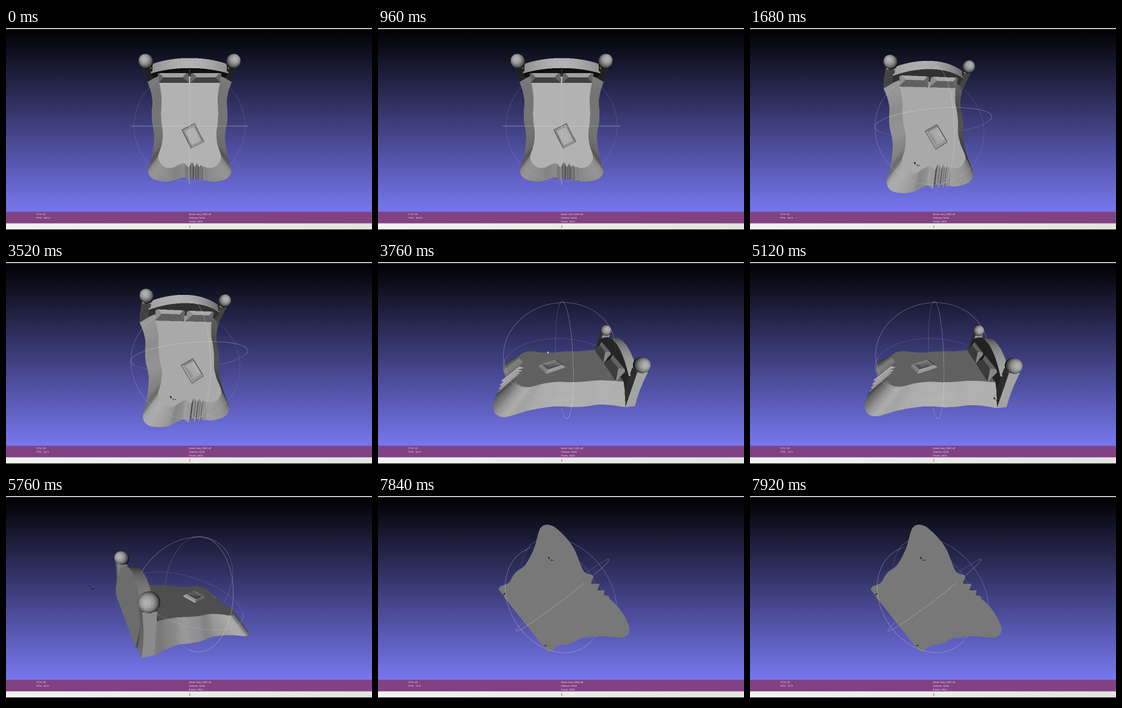
An HTML page with a canvas for the animation above (8000 ms loop, 600x338 px).

```html
<!DOCTYPE html>
<html lang="en">
<head>
<meta charset="utf-8">
<title>Bed mesh viewer</title>
<style>
html, body { margin: 0; width: 100%; height: 100%; overflow: hidden; background: #000; }
canvas, svg { position: absolute; left: 0; top: 0; width: 600px; height: 338px; }
text { font: 4.1px "Liberation Sans", Arial, sans-serif; fill: #eadcee; white-space: pre; text-rendering: geometricPrecision; }
</style>
</head>
<body>
<canvas id="view" width="1200" height="676"></canvas>
<svg viewBox="0 0 600 338">
  <text x="50" y="307.4">FOV: 60</text>
  <text x="50" y="313">FPS:</text>
  <text x="62" y="313" id="fps">200.0</text>
  <text x="300" y="307.4">Mesh: bed_0392.off</text>
  <text x="300" y="313">Vertices: 5446</text>
  <text x="300" y="318.6">Faces: 3810</text>
</svg>
<script>
const SS = 2, W = 600 * SS, H = 338 * SS;
const g = document.getElementById('view').getContext('2d');
const fps = document.getElementById('fps');
g.scale(SS, SS);

const lerp = (a, b, u) => a + (b - a) * u;
const clamp = u => Math.min(1, Math.max(0, u));
const smooth = u => (u = clamp(u)) * u * (3 - 2 * u);
const range = (n, f) => Array.from({ length: n + 1 }, (_, i) => f(i / n));
const sub = (a, b) => a.map((v, i) => v - b[i]);
const dot = (a, b) => a[0] * b[0] + a[1] * b[1] + a[2] * b[2];
const cross = (a, b) => [a[1] * b[2] - a[2] * b[1], a[2] * b[0] - a[0] * b[2], a[0] * b[1] - a[1] * b[0]];
const unit = a => a.map(v => v / (Math.hypot(...a) || 1));

function spline(k, u) {
  const p = u * (k.length - 1), i = Math.min(Math.floor(p), k.length - 2), t = p - i;
  const b = k[i], c = k[i + 1], a = k[i - 1] ?? b, d = k[i + 2] ?? c;
  return b + t / 2 * (c - a + t * (2 * a - 5 * b + 4 * c - d + t * (3 * (b - c) + d - a)));
}

// ---- Bed: x across, y towards the headboard, z up ----
const TOP = -0.1, FLOOR = -0.397;
const faces = [];
const face = (...p) => faces.push(p);

// Skin between successive rings of points
function loft(rings, closed = true) {
  for (let r = 1; r < rings.length; r++) {
    const a = rings[r - 1], b = rings[r], n = a.length;
    for (let i = closed ? 0 : 1; i < n; i++) {
      const j = (i + n - 1) % n;
      face(a[j], a[i], b[i], b[j]);
    }
  }
}
function fan(ring, hub) {
  ring.forEach((p, i) => face(hub, p, ring[(i + 1) % ring.length]));
}

function mattress() {
  const widths = [0.59, 0.545, 0.52, 0.53, 0.525, 0.497, 0.52, 0.585];
  const side = range(42, u => [spline(widths, u), lerp(0.925, -0.56, u)]);
  const lobe = range(18, u => [0.37 + 0.215 * Math.cos(u * 1.92), -0.56 - 0.22 * Math.sin(u * 1.92)]);
  // Folds get narrower to the right
  const folds = range(70, u => {
    const x = lerp(0.29, -0.29, u), turn = (x + 0.165) * (4.76 + 18.9 * (x - 0.045));
    return [x, -0.765 + Math.cos(x * Math.PI / 0.6) * (0.05 + 0.045 * Math.cos(turn * 2 * Math.PI))];
  });
  const half = [...side, ...lobe];
  const outline = [...half, ...folds, ...half.map(([x, y]) => [-x, y]).reverse()];
  const top = outline.map(([x, y]) => [x, y, TOP]);
  const floor = outline.map(([x, y]) => [
    x * (1 + 0.455 * Math.min(1, Math.abs(x) / 0.5) ** 1.5),
    y - 0.35 * smooth((0.05 - y) / 0.7),
    FLOOR
  ]);
  loft([floor, top]);
  fan(top, [0, 0, TOP]);
  fan(floor, [0, 0, FLOOR]);
}

function headboard() {
  const xs = range(32, u => lerp(-0.68, 0.68, u));
  const arch = x => 0.35 - 0.6 * x * x;
  const edge = (y, z) => xs.map(x => [x, y, z(x)]);
  const low = () => FLOOR;
  loft([edge(0.925, low), edge(0.925, arch), edge(1.085, arch), edge(1.085, low), edge(0.925, low)], false);
}

function post(s) {
  const rings = range(10, u => {
    const inner = s * lerp(0.7, 0.64, u), outer = s * lerp(0.85, 0.78, u);
    const front = lerp(0.9, 0.97, u), back = 1.06 + 0.08 * u * u, z = lerp(FLOOR, 0.2, u);
    return [[inner, front, z], [outer, front, z], [outer, back, z], [inner, back, z]];
  });
  loft(rings);
  face(...rings[0]);
  face(...rings[10]);
}

function knob(s) {
  const r = 0.117;
  loft(range(14, v => range(24, u => {
    const a = u * 2 * Math.PI, b = v * Math.PI;
    return [s * 0.712 + r * Math.sin(b) * Math.cos(a), 1.056 + r * Math.sin(b) * Math.sin(a), 0.28 + r * Math.cos(b)];
  })), false);
}

function pillow(mid) {
  const bar = (w, y, z) => [[mid - w, y, z], [mid + w, y, z]];
  const [a, b] = bar(0.28, 0.805, TOP), [c, d] = bar(0.165, 0.86, 0.07), [e, f] = bar(0.27, 0.96, 0.12);
  face(a, b, d, c);
  face(c, d, f, e);
  face(a, c, e);
  face(b, d, f);
}

function tray() {
  const turn = 0.465, c = Math.cos(turn), s = Math.sin(turn);
  const ring = (k, z) => [[-1, -1], [1, -1], [1, 1], [-1, 1]].map(([u, v]) => {
    const x = u * 0.137 * k, y = v * 0.196 * k;
    return [0.06 + x * c - y * s, -0.18 + x * s + y * c, z];
  });
  const steps = [ring(1, TOP), ring(0.95, -0.075), ring(0.74, -0.045), ring(0.68, -0.05), ring(0.36, -0.06)];
  loft(steps);
  face(...steps[4]);
}

mattress();
headboard();
tray();
for (const s of [-1, 1]) {
  post(s);
  knob(s);
  pillow(s * 0.29);
}

// ---- Camera: 60 degree lens, light from the eye ----
const FOCAL = 276, DIST = 3.03, EYE = [0, 0, DIST];
function project([x, y, z]) {
  const w = 1 / (DIST - z);
  return [301 + x * FOCAL * w, 161 - y * FOCAL * w, w];
}

function basis({ y: up, z: out }) {
  const z = unit(out), x = unit(cross(up, z));
  return [x, cross(z, x), z];
}

function fillTri(a, b, c, tone, px, depth) {
  const area = (b[0] - a[0]) * (c[1] - a[1]) - (b[1] - a[1]) * (c[0] - a[0]);
  if (Math.abs(area) < 1e-6) return;
  const lo = k => Math.floor(Math.min(a[k], b[k], c[k]) * SS);
  const hi = k => Math.ceil(Math.max(a[k], b[k], c[k]) * SS);
  for (let j = lo(1); j <= hi(1); j++) {
    for (let i = lo(0); i <= hi(0); i++) {
      const x = (i + 0.5) / SS, y = (j + 0.5) / SS;
      const u = ((x - a[0]) * (c[1] - a[1]) - (y - a[1]) * (c[0] - a[0])) / area;
      const v = ((b[0] - a[0]) * (y - a[1]) - (b[1] - a[1]) * (x - a[0])) / area;
      if (u < -1e-6 || v < -1e-6 || u + v > 1.000001) continue;
      const w = a[2] + u * (b[2] - a[2]) + v * (c[2] - a[2]), n = j * W + i;
      if (w <= depth[n]) continue;
      depth[n] = w;
      px[n * 4] = px[n * 4 + 1] = px[n * 4 + 2] = tone;
      px[n * 4 + 3] = 255;
    }
  }
}

function shoot(pose) {
  const [ax, ay, az] = basis(pose);
  const toView = p => [0, 1, 2].map(i => p[0] * ax[i] + p[1] * ay[i] + p[2] * az[i]);
  const layer = document.createElement('canvas');
  layer.width = W;
  layer.height = H;
  const ctx = layer.getContext('2d'), img = ctx.createImageData(W, H);
  const depth = new Float32Array(W * H);
  for (const f of faces) {
    const v = f.map(toView), q = v.map(project);
    const n = unit(cross(sub(v[2], v[0]), sub(v[3] || v[0], v[1])));
    const lit = dot(n, sub(EYE, v[0])) < 0 ? -n[2] : n[2];
    const tone = 14 + 164 * Math.max(0, lit);
    for (let i = 2; i < q.length; i++) fillTri(q[0], q[i - 1], q[i], tone, img.data, depth);
  }
  ctx.putImageData(img, 0, 0);
  return { layer, depth };
}

// Unit circles around the model, faint where the mesh hides them
function drawRings(pose, depth) {
  const [x, y, z] = basis(pose);
  const sets = [[y, z, '255,226,220'], [z, x, '236,246,218'], [x, y, '190,190,255']];
  g.lineWidth = 0.6;
  for (const [a, b, tint] of sets) {
    const p = range(240, u => {
      const t = u * 2 * Math.PI;
      return a.map((v, i) => v * Math.cos(t) + b[i] * Math.sin(t));
    });
    for (let i = 1; i < p.length; i++) {
      const [x0, y0] = project(p[i - 1]), [x1, y1, w] = project(p[i]);
      const hidden = depth[Math.floor(y1 * SS) * W + Math.floor(x1 * SS)] > w;
      g.strokeStyle = `rgba(${tint},${hidden ? 0.06 : p[i][2] > 0.01 ? 0.48 : 0.27})`;
      g.beginPath();
      g.moveTo(x0, y0);
      g.lineTo(x1, y1);
      g.stroke();
    }
  }
}

function drawCursor(x, y, light) {
  g.fillStyle = light ? '#f2f2f2' : '#080808';
  g.strokeStyle = light ? '#333' : 'rgba(210,210,210,.6)';
  g.lineWidth = 0.3;
  g.beginPath();
  for (const [dx, dy] of [[0, 0], [0, 4.6], [1.2, 3.6], [2.1, 5.4], [2.8, 5], [2, 3.3], [3.4, 3.2]]) g.lineTo(x + dx, y + dy);
  g.closePath();
  g.fill();
  g.stroke();
  if (light) return;
  for (const [dx, dy] of [[4, 5.3], [5.4, 6.4], [7.8, 5.8]]) g.fillRect(x + dx, y + dy, 1.2, 1.2);
}

// View directions of the model's y and z axes
const poses = {
  above: { y: [0, 1, 0], z: [0, 0, 1] },
  tilted: { y: [-0.09, 0.972, -0.214], z: [0.24, 0.23, 0.943] },
  side: { y: [0.985, 0.04, -0.138], z: [0.035, 0.865, 0.5] },
  nudged: { y: [0.988, 0.035, -0.12], z: [0.035, 0.865, 0.5] },
  behind: { y: [-0.815, 0.015, 0.57], z: [0.286, 0.87, 0.39] },
  below: { y: [-0.55, -0.36, -0.755], z: [0.58, 0.5, -0.645] }
};
const shots = {};
for (const name in poses) shots[name] = shoot(poses[name]);

// start, pose, frame rate, cursor
const steps = [
  [0, 'above', '200.0', null],
  [1520, 'tilted', '64.9', [269, 219]],
  [3760, 'side', '64.9', [277.5, 146, true]],
  [3920, 'nudged', '72.5', [399.5, 221]],
  [5280, 'behind', '82.0', [136, 146]],
  [7840, 'below', '76.9', [279, 99]]
];

function fade(x, y, from, to) {
  const f = g.createLinearGradient(0, 0, x, y);
  f.addColorStop(0, from);
  f.addColorStop(1, to);
  return f;
}
const sky = fade(0, 321, '#000', '#7f7fff');
const bar = fade(600, 0, '#f2f2f2', '#e2e5de');

function box(fill, y, h) {
  g.fillStyle = fill;
  g.fillRect(0, y, 600, h);
}

function paint([, name, rate, mouse]) {
  const { layer, depth } = shots[name];
  box('#000', 0, 338);
  box(sky, 2, 319);
  box('#dcdcdc', 0, 1.7);
  g.drawImage(layer, 0, 0, 600, 338);
  drawRings(poses[name], depth);
  box('#804282', 301.5, 19);
  box(bar, 320.5, 10);
  g.fillStyle = '#c8603c';
  g.fillRect(300.8, 323.6, 1.1, 4.4);
  if (mouse) drawCursor(...mouse);
  fps.textContent = rate;
}

const LOOP = 8000, start = performance.now();
let shown = null;
function tick() {
  const t = (performance.now() - start) % LOOP;
  const step = steps.filter(s => s[0] <= t).pop() || steps[0];
  if (step !== shown) paint(shown = step);
  requestAnimationFrame(tick);
}
tick();
</script>
</body>
</html>
```
